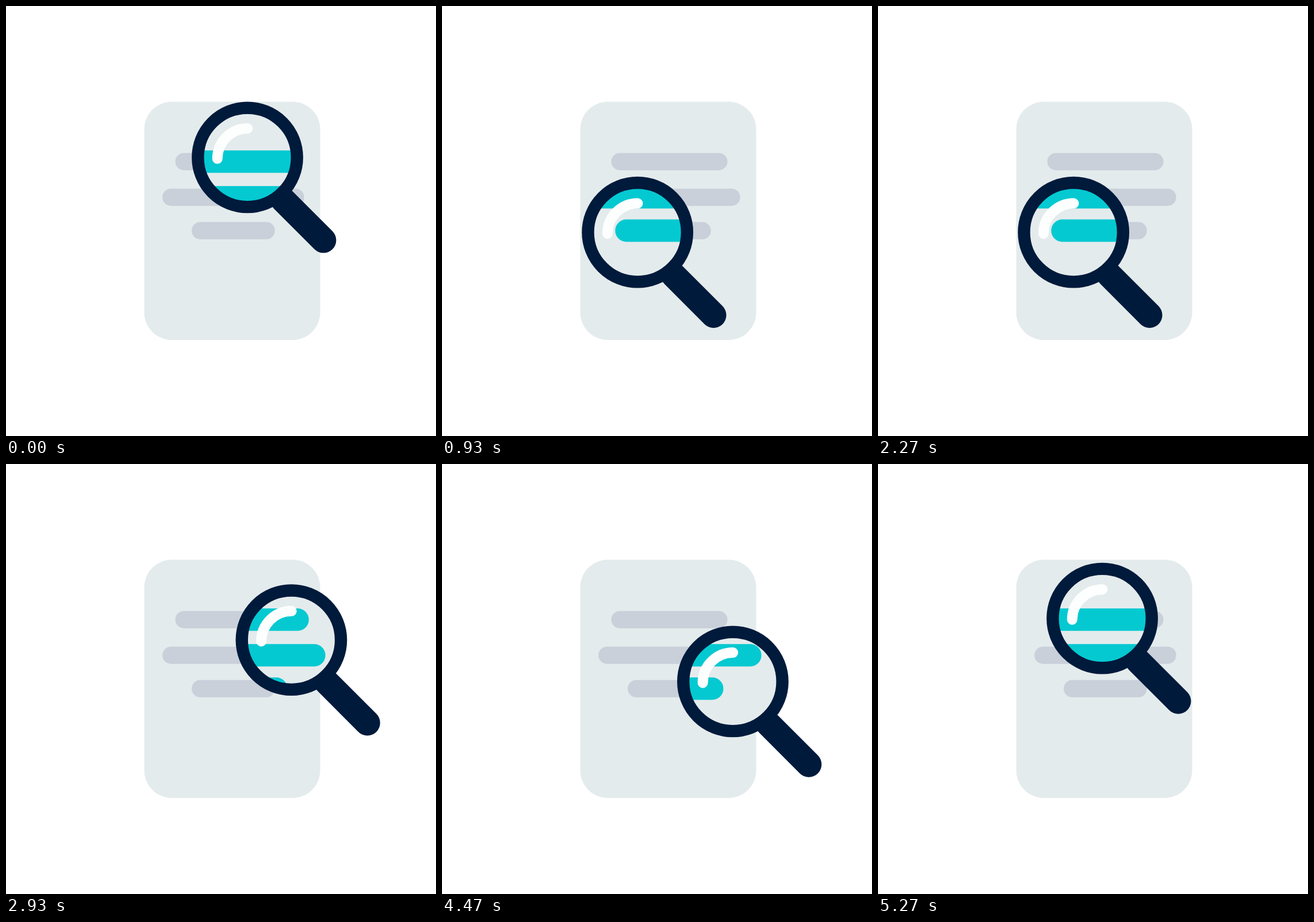
These frames come from a looping animation (748x748 px, 5310 ms). An HTML page with a canvas:

```html
<!DOCTYPE html>
<html lang="en">
<head>
<meta charset="utf-8">
<title>Document search</title>
<style>
  html, body { margin: 0; width: 100%; height: 100%; overflow: hidden; background: #fff; }
  canvas { display: block; }
</style>
</head>
<body>
<canvas id="stage" width="748" height="748"></canvas>
<script>
const ctx = document.getElementById('stage').getContext('2d');
const LOOP = 5310, FPS = 30, TURN = 40; // one turn of the lens takes 40 steps
const PAPER = '#e4ebec', GREY = '#c9d0da', TEAL = '#04c9d1', NAVY = '#001a3b';
const ORBIT = { x: 420, y: 353, r: 89.6 };
const BARS = [[395.5, 270.7, 202], [395.4, 332.7, 246.5], [395.4, 390.8, 144.8]]; // centre x, y, width

function box(x, y, w, h, r, color) {
  ctx.fillStyle = color;
  ctx.beginPath();
  ctx.roundRect(x, y, w, h, r);
  ctx.fill();
}

function bars(scale, color) {
  for (const [x, y, width] of BARS) {
    const w = width * scale, h = 30 * scale;
    box(x - w / 2, y - h / 2, w, h, h / 2, color);
  }
}

function stroke(width, color) {
  ctx.lineWidth = width;
  ctx.strokeStyle = color;
  ctx.stroke();
}

function circle(x, y, r) {
  ctx.beginPath();
  ctx.arc(x, y, r, 0, 2 * Math.PI);
}

// Step number at a time rounded to 10 ms; every third early step is held.
function stepAt(ms) {
  const step = Math.floor((Math.floor(ms / 10) * 10 + 3.4) * FPS / 1000);
  return step < 39 && step % 3 === 2 ? step - 1 : step;
}

// Degrees clockwise from the top: the first quarter is slower.
function angleAt(step) {
  const n = step % TURN, quarter = TURN * 4 / 13;
  return n < quarter ? 90 * n / quarter : 90 + 270 * (n - quarter) / (TURN - quarter);
}

function magnifier(x, y) {
  ctx.lineCap = 'round';
  ctx.beginPath();
  ctx.moveTo(x + 62.4, y + 74.2);
  ctx.lineTo(x + 132.2, y + 144);
  stroke(44.4, NAVY);

  ctx.save();
  circle(x, y, 80);
  ctx.clip();
  ctx.fillStyle = PAPER;
  ctx.fill();
  bars(1.3, TEAL);
  ctx.restore();

  circle(x, y, 86.2);
  stroke(21.4, NAVY);

  ctx.beginPath();
  ctx.arc(x + 0.3, y + 2.2, 52.6, Math.PI, 1.5 * Math.PI);
  stroke(18, '#fdfefe');
}

function draw(now) {
  const a = angleAt(stepAt(now % LOOP)) * Math.PI / 180;
  ctx.clearRect(0, 0, 748, 748);
  box(240.5, 166.5, 306, 414.5, 48, PAPER);
  bars(1, GREY);
  magnifier(ORBIT.x + ORBIT.r * Math.sin(a), ORBIT.y - ORBIT.r * Math.cos(a));
}

const start = performance.now();
function tick() {
  draw(performance.now() - start);
  requestAnimationFrame(tick);
}
tick();
</script>
</body>
</html>
```
